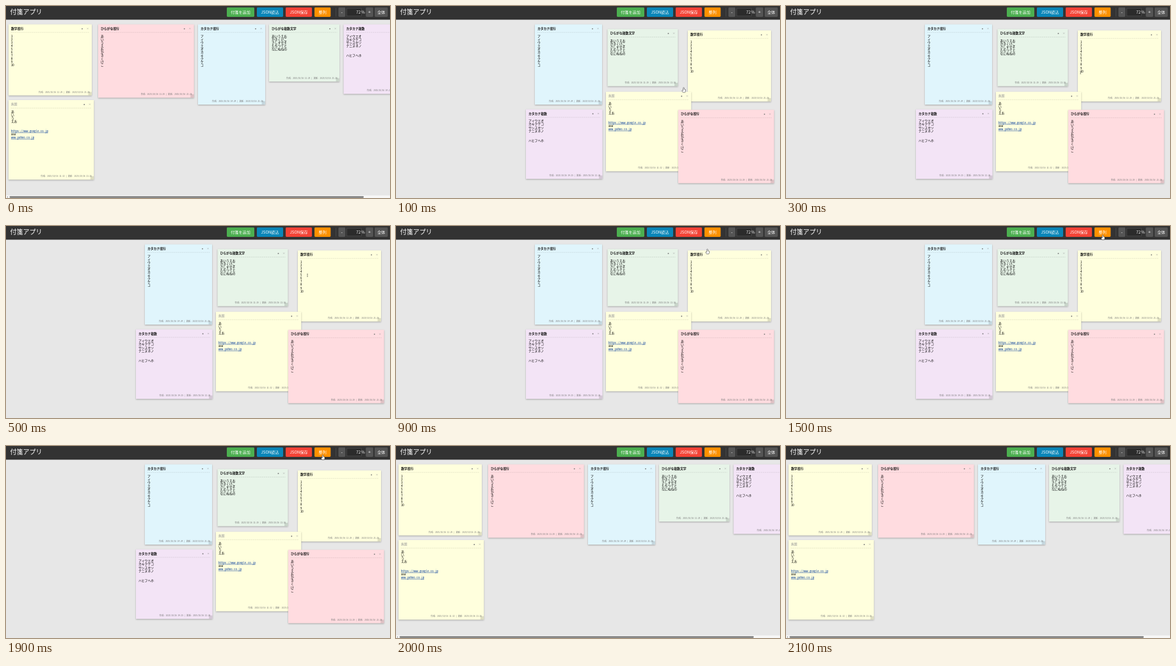
Write an HTML page that moves like this. It is 600 px wide and 300 px high and loops after 2500 ms.

```html
<!DOCTYPE html>
<html lang="ja">
<head>
<meta charset="utf-8">
<title>付箋アプリ</title>
<style>
html, body { margin: 0; width: 100%; height: 100%; overflow: hidden; background: #e7e7e7; }
svg { display: block; width: 600px; height: 300px; }
text { font-family: "Noto Sans CJK JP", "Noto Sans CJK", "Noto Sans", sans-serif; white-space: pre; }
.mono { font-family: "Noto Sans Mono CJK JP", "Noto Sans CJK JP", "Noto Sans Mono", monospace; }
.paper { filter: drop-shadow(.6px 1px 1px rgba(0, 0, 0, .28)); }
</style>
</head>
<body>
<svg id="stage" viewBox="0 0 600 300"></svg>
<script>
const LOOP = 2500, SCATTER = 100, ARRANGE = 2000;
const stage = document.getElementById('stage');

function el(tag, attrs, parent = stage, content = '') {
  const node = document.createElementNS('http://www.w3.org/2000/svg', tag);
  for (const key in attrs) node.setAttribute(key, attrs[key]);
  node.textContent = content;
  return parent.appendChild(node);
}
const box = (x, y, width, height, fill, parent, extra) =>
  el('rect', { x, y, width, height, fill, ...extra }, parent);

// cy is the visual middle of the line
const label = (str, x, cy, size, fill, parent, extra) =>
  el('text', { x, y: cy + size * .36, 'font-size': size, fill, ...extra }, parent, str);

const MID = { 'text-anchor': 'middle' };
const column = str => [...str];

const notes = [
  { title: '数字改行', fill: '#ffffdd', w: 130, h: 111, home: [4, 28.7], away: [456, 38.2],
    made: '16 11:29', lines: ['1', '2', '3', '4', '5', '6', '7', '8', '9', '10'] },
  { title: 'カタカナ改行', fill: '#e0f5fc', w: 105, h: 125.3, home: [300, 28.7], away: [217, 28.7],
    made: '16 14:24', lines: column('アイウエオカキクケコ') },
  { title: 'ひらがな複数文字', fill: '#e7f4e8', w: 110, h: 89.3, home: [411, 28.7], away: [330.5, 36],
    made: '16 11:29', lines: ['あいうえお', 'かきくけこ', 'さしすせそ', 'たちつてと', 'なにぬねの'] },
  { title: 'カタカナ複数', fill: '#f3e4f6', w: 119.6, h: 108.6, home: [527.5, 28.7], away: [203, 161.5],
    made: '16 14:25', lines: ['アイウエオ', 'カキクケコ', 'サシスセソ', 'ナニヌネノ', '', '', 'ハヒフヘホ'] },
  { title: '無題', fill: '#ffffdd', muted: true, w: 133.3, h: 124.3, home: [4, 147], away: [328, 134],
    made: '16 11:32', lines: ['あ', 'い', 'う', 'えお', '', '', 'https://www.google.co.jp', 'aaa', 'www.yahoo.co.jp'] },
  { title: 'ひらがな改行', fill: '#ffdce0', w: 149.7, h: 114.6, home: [144, 28.7], away: [441, 162.2],
    made: '16 11:29', lines: column('あいうえおかきくけこ') }
];

function drawNote(note) {
  const { w, h } = note;
  const g = note.node = el('g', {});
  box(0, 0, w, h, note.fill, g, { class: 'paper' });
  label(note.title, 3.9, 6.4, 4.85, note.muted ? '#999' : '#111', g, { 'font-weight': note.muted ? 400 : 700 });
  el('circle', { cx: w - 15, cy: 6.9, r: .95, fill: '#777' }, g);
  el('path', { d: `M${w - 7.4} 5.6l2 2m0-2l-2 2`, stroke: '#999', 'stroke-width': .45 }, g);
  el('path', { d: `M3.6 12.5H${w - 3.6}`, stroke: '#000', 'stroke-opacity': .14, 'stroke-width': .7, 'stroke-dasharray': '2 1' }, g);
  note.lines.forEach((line, i) => {
    const cy = 18.2 + i * 5.05;
    const link = /^(https|www)/.test(line);
    label(line, 3.9, cy, 4.84, link ? '#0a3f9c' : '#000', g, { class: 'mono' });
    if (link) box(3.9, cy + 2.2, line.length * 2.42, .5, '#0a3f9c', g);
  });
  label(`作成: 2025/10/${note.made} | 更新: 2025/10/16 21:26`, w - 3.3, h - 5.2, 3.4, '#777', g,
    { class: 'mono', 'text-anchor': 'end' });
  box(w - 5.4, h - 5.4, 5.2, 5.2, '#000', g, { opacity: .13 });
}

function button(str, x, w, fill, size = 6.1) {
  box(x, 2.3, w, 14.7, fill, stage, { rx: 1.4 });
  label(str, x + w / 2, 9.7, size, '#fff', stage, MID);
}

notes.forEach(drawNote);

const scrollbar = el('g', {});
box(0, 296, 600, 4, '#f7f7f7', scrollbar);
box(5.5, 297, 553.5, 3, '#8a8a8a', scrollbar, { rx: 1.4 });
el('path', { d: 'M3 297.3v2.4l-1.6-1.2z', fill: '#8a8a8a' }, scrollbar);

box(0, 0, 600, 21.4, '#333');
label('付箋アプリ', 6.5, 9.7, 10, '#fff');
button('付箋を追加', 345, 43, '#4caf50');
button('JSON読込', 392, 41, '#0a86b8');
button('JSON保存', 437, 41, '#f44336');
button('整列', 482, 25.3, '#ff9100');
box(515, 3, .6, 13.5, '#555');
button('-', 519.4, 10.8, '#555', 7);
box(532.4, 3.8, 23.2, 12, '#2b2b2b', stage, { stroke: '#555', 'stroke-width': .6 });
label('72', 554, 9.7, 6, '#fff', stage, { 'text-anchor': 'end' });
label('%', 555.2, 9.7, 6, '#fff');
button('+', 562.2, 11.6, '#555', 7);
button('全体', 576, 20.6, '#555');

const pointer = el('g', {});
const hand = el('path', {
  d: 'M-.8-3.2Q0-4.2.8-3.2V-1L3-.3V2.2L2.2 4H-1.2L-2.8 1.2Q-2.8.2-.8 1Z',
  fill: '#fff', stroke: '#222', 'stroke-width': .5
}, pointer);
const beam = el('path', { d: 'M-.8-2h1.6M0-2v4M-.8 2h1.6', fill: 'none', stroke: '#333', 'stroke-width': .5 }, pointer);

// time, x, y
const path = [[100, 449.5, 131], [500, 471, 77], [700, 478, 62], [1100, 495, 17.5], [2000, 495, 17.5]];

function pointerAt(t) {
  const i = Math.max(1, path.findIndex(p => t <= p[0]));
  const [a, b] = [path[i - 1], path[i]];
  const k = (t - a[0]) / (b[0] - a[0]);
  return [a[1] + (b[1] - a[1]) * k, a[2] + (b[2] - a[2]) * k];
}

function draw(now) {
  const t = Math.floor(now % LOOP / 100) * 100;
  const scattered = t >= SCATTER && t < ARRANGE;
  for (const note of notes) {
    note.node.setAttribute('transform', `translate(${scattered ? note.away : note.home})`);
  }
  scrollbar.style.display = scattered ? 'none' : '';
  pointer.style.display = scattered ? '' : 'none';
  if (scattered) {
    const [x, y] = pointerAt(t);
    const typing = x > 456 && y > 50 && y < 140;
    pointer.setAttribute('transform', `translate(${x} ${y})`);
    hand.style.display = typing ? 'none' : '';
    beam.style.display = typing ? '' : 'none';
  }
}

const start = performance.now();
function tick() {
  draw(performance.now() - start);
  requestAnimationFrame(tick);
}
tick();
</script>
</body>
</html>
```
